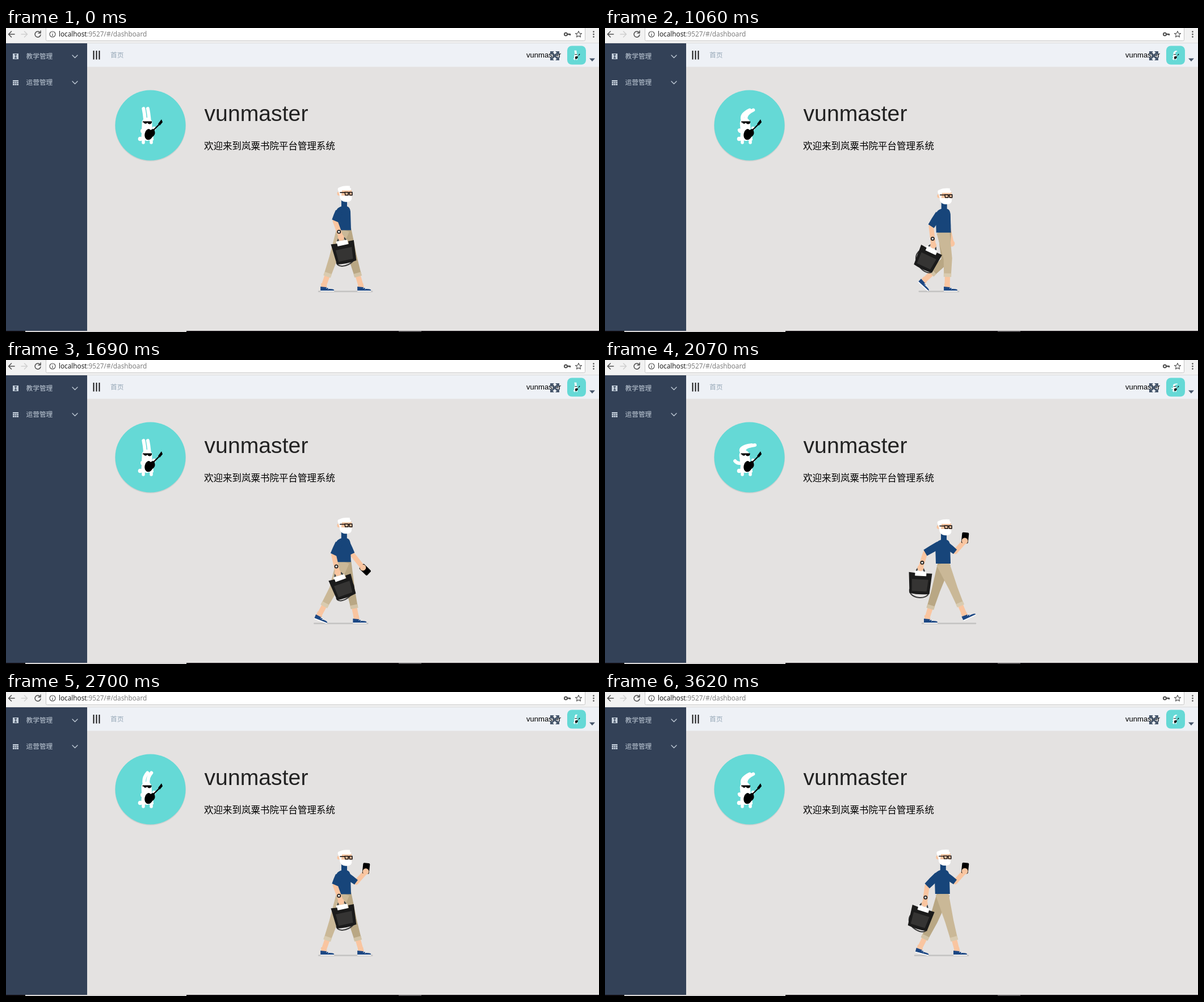
These frames come from a looping animation (1045 px wide and 536 px high, 3720 ms). An HTML page:

```html
<!DOCTYPE html>
<html lang="zh">
<head>
<meta charset="utf-8">
<title>Dashboard</title>
<style>
  html, body { margin: 0; width: 100%; height: 100%; overflow: hidden; }
  svg { display: block; }
  text { font-family: "Liberation Sans", Arial, "Noto Sans CJK SC", "Noto Sans CJK", sans-serif; }
  .line { fill: none; stroke-linecap: round; stroke-linejoin: round; }
  .skin { fill: #f9c5a0; }
  .arm { stroke: #f9c5a0; stroke-width: 8.500; }
  .shirt { fill: #17457a; }
  .near { fill: #cab897; }
  .far { fill: #b9a784; }
</style>
</head>
<body>
<svg width="1045" height="536" viewBox="0 0 1045 536">
  <defs>
    <g id="rabbit">
      <g class="line" stroke="#fff">
        <path id="ears" stroke-width="6"/>
        <path id="body" stroke-width="18"/>
        <path id="paw" stroke-width="6"/>
        <path d="M242 194V202M256 194V202" stroke-width="5.500"/>
      </g>
      <path d="M240 170L259 184L260 198H238Z" fill="#fff"/>
      <circle cx="236.500" cy="195.500" r="3.800" fill="#fff"/>
      <circle cx="261" cy="177" r="3.200" fill="#fff"/>
      <path id="shades"/>
      <path class="line" d="M257 183L274 166" stroke="#000" stroke-width="2.200"/>
      <path d="M268 169L274 161L276 166L271 172Z"/>
      <path d="M246 182Q251 175 255 180Q261 175 262 182Q264 188 258 192Q253 200 247 196Q242 191 246 182Z"/>
    </g>
    <g id="shoe">
      <path class="skin" d="M-5 -4H4L6 5H-5Z"/>
      <path d="M-6 2L4 3L10 6Q19 6 18 9H-6Z" fill="#1c4783"/>
      <path d="M-6 9H18V10.500H-6Z" fill="#fff"/>
      <path d="M4 5L7 3M7 6.500L10 4.500" stroke="#fff"/>
    </g>
  </defs>

  <!-- browser bar -->
  <rect width="1045" height="536" fill="#e4e2e1"/>
  <rect width="1045" height="27" fill="#f2f2f2"/>
  <rect x="70.500" y="-4" width="950" height="26.500" rx="2" fill="#fff" stroke="#c6c6c6"/>
  <path d="M0 26.500H1045" stroke="#dcdcdc"/>
  <g class="line" stroke="#505050" stroke-width="1.500">
    <path d="M15 11H5M9.500 6L4.500 11L9.500 16"/>
    <path d="M27 11H37M32.500 6L37.500 11L32.500 16" stroke="#cfcfcf"/>
    <path d="M60 8A5 5 0 1 0 61 12M61 5V9H57"/>
    <path d="M82 10.500V14M82 8V8.100M87 11A5 5 0 1 0 77 11A5 5 0 1 0 87 11" stroke-width="1.200"/>
    <path d="M1009 5.500L1010.600 9.200L1014.500 9.600L1011.600 12.200L1012.500 16L1009 14L1005.500 16L1006.400 12.200L1003.500 9.600L1007.400 9.200Z" stroke-width="1.100"/>
    <path d="M989 11H994V13" stroke-width="2.400" stroke-linecap="butt"/>
    <circle cx="986.500" cy="11" r="2.500" stroke-width="2"/>
    <path d="M1035.500 6.500V6.600M1035.500 11V11.100M1035.500 15.500V15.600" stroke-width="2.600"/>
  </g>
  <text x="93" y="15.300" font-size="11.800" style="font-family:'Open Sans',sans-serif" fill="#777"><tspan fill="#111">localhost</tspan>:9527/#/dashboard</text>

  <!-- sidebar -->
  <rect y="27" width="143" height="507" fill="#334157"/>
  <g fill="#c3ceda" font-size="11.700">
    <text x="35.500" y="54">教学管理</text>
    <text x="35.500" y="100">运营管理</text>
    <path d="M12 45H22V55H12Z"/>
    <path d="M15 47H19M17 47V53M15 53H19" stroke="#334157" stroke-width="1.300"/>
    <path d="M12 92H22V101H12Z"/>
    <path d="M12 94.500H22M12 97.800H22M15.300 94V101M18.700 94V101" stroke="#334157" stroke-width=".7"/>
    <path class="line" d="M117 48L121.500 52.500L126 48M117 94L121.500 98.500L126 94" stroke="#c3ceda" stroke-width="1.300"/>
  </g>

  <!-- header -->
  <rect x="143" y="27" width="902" height="41.500" fill="#eef1f6"/>
  <path d="M154.500 40V55.500M159.500 40V55.500M164.500 40V55.500" stroke="#111" stroke-width="1.900"/>
  <text x="184" y="52" font-size="11.800" fill="#97a8b8">首页</text>
  <text x="917" y="52" font-size="13.100">vunmaster</text>
  <g fill="#46566b">
    <path d="M959 41H966L959 48ZM975 41V48L968 41ZM959 57V50L966 57ZM975 57H968L975 50Z"/>
    <path d="M962 44L972 54M972 44L962 54" stroke="#46566b" stroke-width="3"/>
    <path d="M1028 53.500H1038L1033 59Z"/>
  </g>
  <rect x="989" y="31.500" width="33" height="33" rx="8" fill="#65d9d6"/>
  <use href="#rabbit" transform="translate(1005.500 48) scale(.266) translate(-254 -171.500)"/>

  <!-- welcome -->
  <circle cx="254.500" cy="172.500" r="62.500" fill="#cfd1d0"/>
  <circle cx="254.500" cy="171.500" r="62" fill="#65d9d6"/>
  <use href="#rabbit"/>
  <text x="349.500" y="164" font-size="39.200" fill="#222">vunmaster</text>
  <text x="349" y="214" font-size="16.500">欢迎来到岚粟书院平台管理系统</text>

  <!-- walker -->
  <path id="shadow" class="line" stroke="#c3c2c2" stroke-width="2.500"/>
  <path id="farSkin" class="line arm"/>
  <rect id="phone" x="-6" y="-15" width="12" height="19" rx="2"/>
  <circle id="farHand" class="skin" r="5.500"/>
  <path id="farSleeve" class="shirt"/>
  <path id="farShin" class="skin"/>
  <use id="farShoe" href="#shoe"/>
  <path id="farPants" class="far"/>
  <path id="farCuff" fill="#d2c3a6"/>
  <path id="nearShin" class="skin"/>
  <use id="nearShoe" href="#shoe"/>
  <path id="nearPants" class="near"/>
  <path id="nearCuff" fill="#d9cbb0"/>
  <g id="torso">
    <path class="shirt" d="M592 304H602V316Q607 317 608 325L609 358H583L582 326Q584 318 592 316Z"/>
    <path class="skin" d="M590 287H610V299H590Z"/>
    <circle class="skin" cx="588" cy="293.500" r="3.500"/>
    <path fill="#fff" d="M587 290Q583 283 590 282Q596 279 607 280V283Q611 285 608 288L593 288L592 297H600Q606 295 610 298Q612 307 603 308Q589 309 589 297Z"/>
    <path class="line" d="M590 291.500H598M598 291H604V296H599ZM606 291H611V296H606.500ZM604 292H606" stroke="#2b2320" stroke-width="1.700"/>
  </g>
  <g id="bag">
    <path id="strap" class="line" stroke="#3a3a3a" stroke-width="2"/>
    <path class="line" d="M-8 -18Q-6 -28 0 -28Q6 -28 8 -18" stroke="#3b4145" stroke-width="2.500"/>
    <path d="M-10 -22L10 -21V-12H-10Z" fill="#fff"/>
    <path d="M-20 -19L-9 -18V-13H11V-18L21 -18L18 18Q0 21 -17 18Z" fill="#1b1b1b"/>
    <path d="M-14 -7H15L13 14H-13Z" fill="#353433"/>
  </g>
  <path id="nearSkin" class="line arm"/>
  <circle id="nearHand" class="skin" r="5.500"/>
  <path id="nearSleeve" class="shirt"/>
  <circle id="watch" r="2.600" fill="#fff" stroke="#222" stroke-width="1.800"/>

  <!-- screen bottom -->
  <path d="M0 535H1045" stroke="#0c080c" stroke-width="2"/>
  <path d="M34 535H318" stroke="#d8d6d6" stroke-width="2"/>
  <path d="M692 535H732" stroke="#4a474a" stroke-width="2"/>
</svg>
<script>
const LOOP = 3720, STEPS = 48, NOD_STEPS = 11;
const TAU = 2 * Math.PI;

// Walk cycles completed at a step; a whole number is a heel strike of the near foot
const pace = [[0, .56], [7, .77], [14, 1.23], [22, 1.62], [27, 2], [35, 2.56], [47, 3.1]];
// Shoe angle over one cycle of a leg
const footRoll = [[0, -25], [.06, 0], [.56, 0], [.7, 50], [1, -25]];

const set = (id, attrs) => {
  for (const name in attrs) document.getElementById(id).setAttribute(name, attrs[name]);
};
const draw = (id, d) => set(id, { d });
const place = (id, [x, y], turn = 0) => set(id, { transform: `translate(${x} ${y}) rotate(${turn})` });
const mix = (a, b, u) => a + (b - a) * u;
const between = (p, q, u) => [mix(p[0], q[0], u), mix(p[1], q[1], u)];
const clamp = u => Math.max(0, Math.min(1, u));
const smooth = u => u * u * (3 - 2 * u);
const line = (...points) => 'M' + points.join('L');

function along(keys, x) {
  const i = Math.max(1, keys.findIndex(key => key[0] >= x));
  const [[x0, y0], [x1, y1]] = [keys[i - 1], keys[i]];
  return mix(y0, y1, (x - x0) / (x1 - x0));
}

function taper(points, widths) {
  const left = [], right = [];
  points.forEach(([x, y], i) => {
    const [ax, ay] = points[Math.max(i - 1, 0)];
    const [bx, by] = points[Math.min(i + 1, points.length - 1)];
    const k = widths[i] / 2 / (Math.hypot(bx - ax, by - ay) || 1);
    left.push([x + (ay - by) * k, y + (bx - ax) * k]);
    right.unshift([x - (ay - by) * k, y - (bx - ax) * k]);
  });
  return line(...left, ...right) + 'Z';
}

// Draws one leg and returns the x of its ankle
function drawLeg(side, hip, cycles) {
  const q = cycles % 1, liftOff = .64;
  const stride = s => 633 - 130 * s;
  const tilt = along(footRoll, q);
  const ankle = [
    q < liftOff ? stride(q) : mix(stride(liftOff), stride(0), smooth((q - liftOff) / (1 - liftOff))),
    454 - 14 * Math.sin(Math.abs(tilt) * TAU / 360),
  ];
  const dx = ankle[0] - hip[0], dy = ankle[1] - hip[1], d = Math.hypot(dx, dy);
  const bend = (Math.sqrt(Math.max(0, 47.5 ** 2 - d * d / 4)) + .2 * Math.max(0, tilt)) / d;
  const knee = [hip[0] + dx / 2 + dy * bend, hip[1] + dy / 2 - dx * bend];
  draw(side + 'Shin', taper([knee, ankle], [10, 9]));
  draw(side + 'Pants', taper([hip, between(hip, knee, .5), knee, between(knee, ankle, .65)], [23, 19, 15, 12.5]));
  draw(side + 'Cuff', taper([between(knee, ankle, .55), between(knee, ankle, .68)], [13.5, 13.5]));
  place(side + 'Shoe', ankle, tilt);
  return ankle[0];
}

function drawArm(side, shoulder, elbow, hand, width) {
  draw(side + 'Sleeve', taper([shoulder, between(shoulder, elbow, .5), elbow], [width, width, width - 1]));
  draw(side + 'Skin', line(elbow, hand));
  place(side + 'Hand', hand);
}

function drawBag(hand, tilt) {
  const a = tilt * TAU / 360;
  place('bag', [hand[0] - 27 * Math.sin(a), hand[1] + 27 * Math.cos(a)], tilt);
  // The loose strap climbs the side that hangs lower
  const l = Math.max(0, tilt / 25), r = Math.max(0, -tilt / 25);
  draw('strap', `M-17 ${15 - 25 * l}C${-16 - 16 * l} ${30 - 14 * l} ${16 + 16 * r} ${30 - 14 * r} 17 ${15 - 25 * r}`);
}

function drawWalker(step) {
  const cycles = along(pace, step);
  const swing = Math.cos(TAU * (cycles - .95));
  const bob = 2.5 - 4.5 * Math.cos(2 * TAU * (cycles - .1));
  const sway = .4 * (bob - 1);

  const feet = [
    drawLeg('far', [598 + sway, 357 + bob], cycles + .5),
    drawLeg('near', [595 + sway, 357 + bob], cycles),
  ];
  draw('shadow', `M${Math.min(...feet) - 9} 464.500H${Math.max(...feet) + 20}`);
  place('torso', [sway, bob]);

  // The far arm swings until it fetches the phone
  const raise = clamp((step - 16) / 11);
  const pocket = [636, 390];
  const low = [615 + 22 * swing, 380];
  const farHand = between(between(low, pocket, raise), between(pocket, [634, 318 + bob], raise), raise);
  const farElbow = between([606 + 10 * swing, 350], [617, 337 + bob], raise);
  drawArm('far', [602 + sway, 325 + bob], farElbow, farHand, 11);
  place('phone', farHand, mix(288, 6, raise));
  set('phone', { visibility: raise > .3 ? 'visible' : 'hidden' });

  const hand = [575 - 20 * swing, 381 - 17 * swing ** 2 + bob];
  const elbow = [573 - 9 * swing, 347 - 9 * swing ** 2 + bob];
  drawBag(hand, 25 * Math.sin(TAU * (cycles + .02)));
  drawArm('near', [588 + sway, 325 + bob], elbow, hand, 13);
  place('watch', between(elbow, hand, .65));
}

function drawRabbit(step) {
  const crouch = .5 - .5 * Math.cos(TAU * step / NOD_STEPS);
  const angle = (-8 + 88 * crouch) * TAU / 360;
  const ear = (x, y) => `M${x} ${y}Q${x - 1 - 2 * crouch} ${y - 11 + 3 * crouch} ` +
    `${x + 19 * Math.sin(angle)} ${y - 9 - 10 * Math.cos(angle)}`;
  draw('ears', ear(245 - 5 * crouch, 161) + ear(252.5 - 7 * crouch, 161));
  draw('body', `M${248.5 - 3 * crouch} ${167 + crouch}L248.500 190`);
  const reach = Math.max(0, crouch - .4) * 1.7;
  draw('paw', `M242 181Q${240 - 6 * reach} 184 ${240 - 11 * reach} ${181 - 3 * reach}`);
  draw('shades', `M${241 - 1.5 * crouch} 164.500h16v2q-1 3 -4 3q-3 0 -4 -3q-1 3 -4 2q-2 0 -2 -2h-2z`);
}

function frame(now) {
  // Picture changes fall slightly ahead of an even grid
  const step = Math.min(STEPS - 1, Math.floor((now % LOOP + 30) * STEPS / LOOP));
  drawWalker(step);
  drawRabbit(step);
  requestAnimationFrame(frame);
}
frame(0);
</script>
</body>
</html>
```
